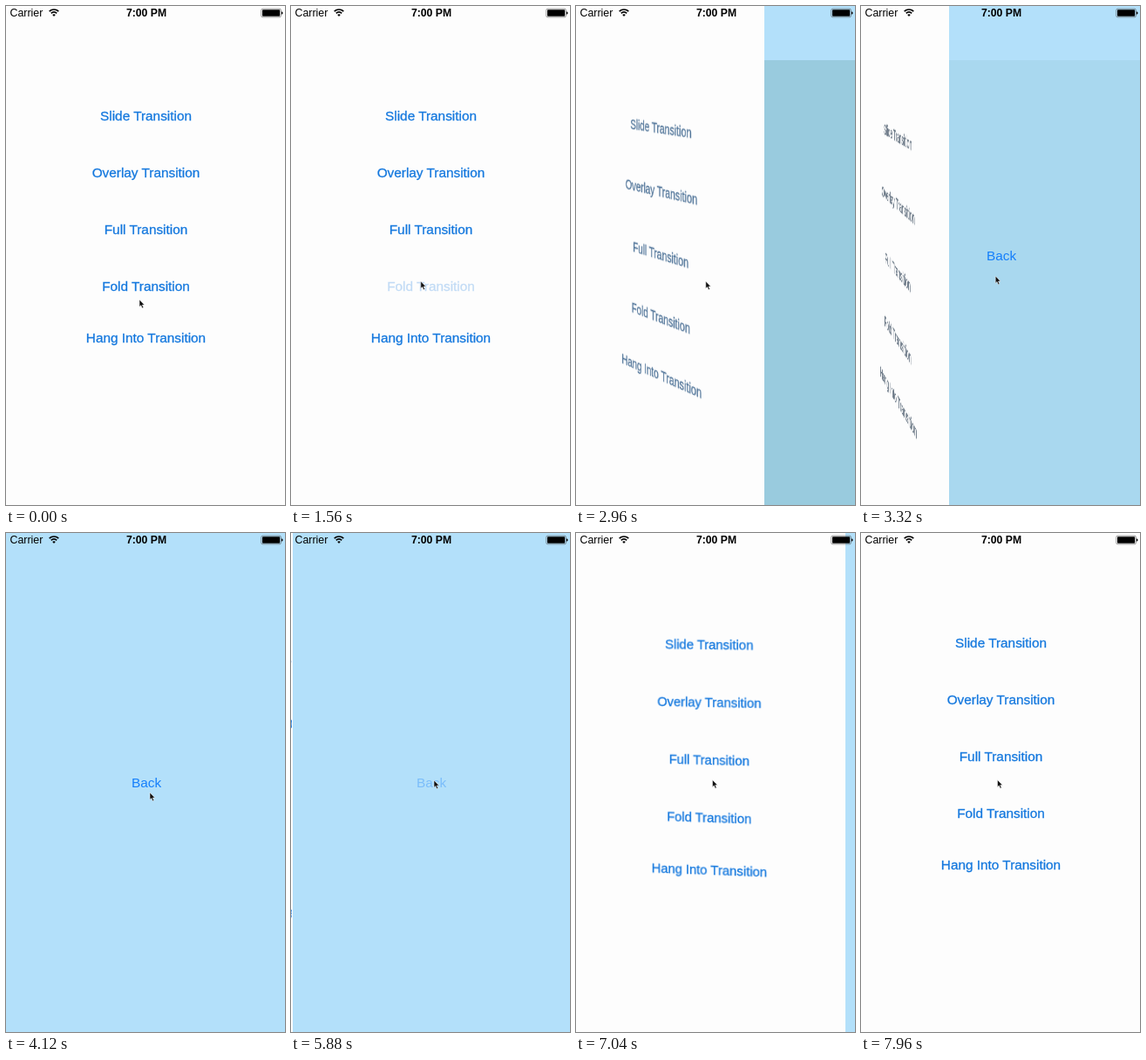
Animation, 320 px wide and 571 px high, one loop 8000 ms. Source, as an HTML page:

```html
<!DOCTYPE html>
<html lang="en">
<head>
<meta charset="utf-8">
<title>Fold transition</title>
<style>
  html, body { margin: 0; width: 100%; height: 100%; overflow: hidden; background: #fdfdfd; }
  #stage { position: relative; width: 320px; height: 571px; overflow: hidden; background: #b3e0fa; }
  #stage > * { position: absolute; left: 0; top: 0; }
  svg { display: block; overflow: visible; font: 15.35px "Liberation Sans", Arial, sans-serif; }
  #stage > #shade { top: 62px; width: 320px; height: 509px; }
  #menu { width: 320px; height: 571px; background: #fdfdfd; transform-origin: 0 0; }
  #list { stroke-width: .3; }
  .label { text-anchor: middle; }
</style>
</head>
<body>
<div id="stage">
  <div id="shade"></div>
  <svg width="320" height="571"><text id="back" class="label" x="161" y="290.6">Back</text></svg>
  <div id="menu">
    <svg id="list" width="320" height="571">
      <text class="label" x="160.5" y="130.6">Slide Transition</text>
      <text class="label" x="160.5" y="196">Overlay Transition</text>
      <text class="label" x="160.5" y="261">Full Transition</text>
      <text id="fold" class="label" x="160.5" y="325.8">Fold Transition</text>
      <text class="label" x="160.5" y="385.2">Hang Into Transition</text>
    </svg>
  </div>
  <svg width="320" height="20">
    <text x="4.5" y="12.2" font-size="12.4">Carrier</text>
    <text class="label" x="161" y="12.2" font-size="12.2" font-weight="bold">7:00 PM</text>
    <g fill="none" stroke="#000" stroke-width="1.7">
      <path d="M49.7 6.2A7.5 7.5 0 0 1 60.3 6.2"/>
      <path d="M51.8 8.3A4.5 4.5 0 0 1 58.2 8.3"/>
    </g>
    <path d="M55 12L53.2 10.1A2.6 2.6 0 0 1 56.8 10.1Z"/>
    <rect x="292.8" y="3.2" width="22.6" height="9.6" rx="1.6" fill="none" stroke="#555" stroke-width=".6"/>
    <rect x="294" y="4.2" width="20.2" height="7.6" rx=".8"/>
    <path d="M316 6.3Q317.6 6.8 317.6 8T316 9.7Z"/>
  </svg>
  <svg id="cursor" width="8" height="12">
    <path d="M0 0V8.2L1.8 6.5L3.2 9.7L4.7 9.1L3.3 6H5.8Z" fill="#111" stroke="#fff" stroke-width=".5"/>
  </svg>
</div>
<script>
const LOOP = 8000;
const OPEN = [1650, 3907], CLOSE = [5814, 7647];
const DEPTH = 860;
const TINT = [20, 120, 222], GREY = [110, 110, 110];
const BLUE = [179, 224, 250], DUSK = [107, 165, 174];
// time, x, y of the pointer tip
const POINTER = [
  [0, 153, 336], [40, 153, 337], [200, 142, 372], [320, 117, 368], [480, 134, 336],
  [640, 148.8, 315], [3120, 148.8, 315], [3720, 165, 297], [4240, 165, 297],
  [4640, 163, 283], [5000, 161, 283], [5400, 164, 283], [6080, 164, 283],
  [6440, 156.5, 282.5]
];
const $ = id => document.getElementById(id);
const clamp = v => Math.min(1, Math.max(0, v));
const span = (t, a, b) => clamp((t - a) / (b - a));
const lerp = (a, b, k) => a + (b - a) * k;
const mix = (a, b, k) => `rgb(${a.map((v, i) => Math.round(lerp(v, b[i], k)))})`;

// cubic-bezier(.42, 0, .58, 1)
function ease(u) {
  let lo = 0, hi = 1;
  for (let i = 0; i < 24; i++) {
    const s = (lo + hi) / 2, r = 1 - s;
    if (1.26 * s * r * r + 1.74 * s * s * r + s * s * s < u) lo = s; else hi = s;
  }
  return lo * lo * (3 - 2 * lo);
}

// pressed label: drops at once, fades back after release
function press(t, down, up, end) {
  return t < down ? 1 : lerp(0.25, 1, span(t, up, end));
}

function pointerAt(t) {
  const i = POINTER.findIndex(p => p[0] > t);
  if (i < 0) return POINTER[POINTER.length - 1].slice(1);
  const a = POINTER[i - 1], b = POINTER[i], k = span(t, a[0], b[0]);
  return [lerp(a[1], b[1], k), lerp(a[2], b[2], k)];
}

function draw(t) {
  const opened = ease(span(t, ...OPEN)), closed = ease(span(t, ...CLOSE));
  const turn = opened - closed;
  const closing = t >= CLOSE[0];
  const menu = $("menu").style, list = $("list").style;
  menu.visibility = turn > 0.9995 ? "hidden" : "visible";
  // the perspective grows together with the angle
  menu.transform = turn > 0.0001
    ? `perspective(${DEPTH / turn}px) rotateY(${-90 * turn}deg)` : "none";
  list.fill = list.stroke = mix(TINT, GREY, closing ? 0 : opened);
  $("fold").style.opacity = press(t, 1320, 1560, 1960);
  $("back").style.fill = mix([20, 126, 251], GREY, closed);
  $("back").style.opacity = press(t, 5680, 5814, 6300);
  $("shade").style.background = mix(DUSK, BLUE, opened);
  const [x, y] = pointerAt(t);
  $("cursor").style.transform = `translate(${x}px, ${y}px)`;
}

const start = performance.now();
function tick() {
  draw((performance.now() - start) % LOOP);
  requestAnimationFrame(tick);
}
tick();
</script>
</body>
</html>
```
